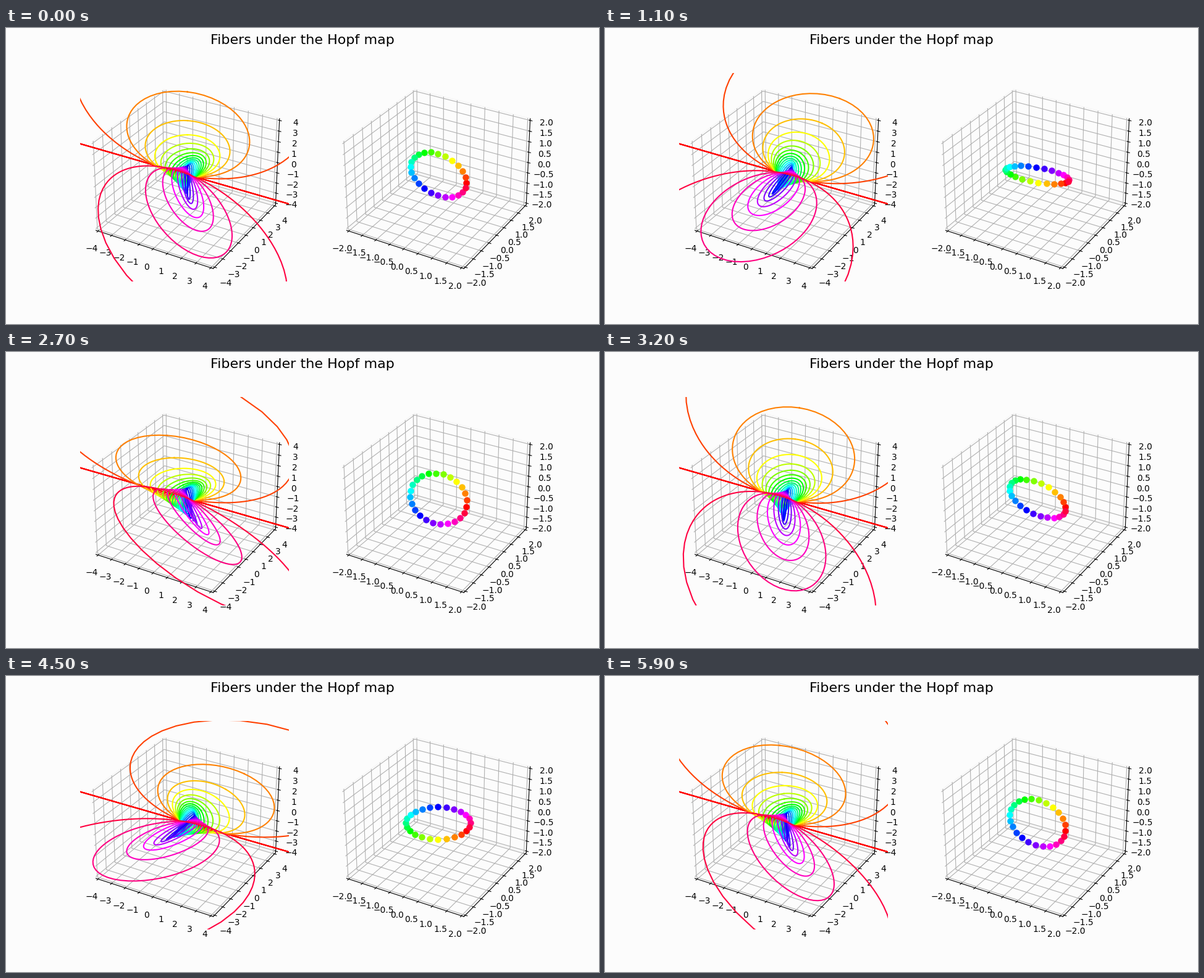
Animation of 960x480 px, one loop 6 s. Source, as a matplotlib script:

```python
import numpy as np
import matplotlib.pyplot as plt
from matplotlib.animation import FuncAnimation
from matplotlib.colors import hsv_to_rgb

FRAMES, INTERVAL = 60, 100
COUNT = 24
BG = "#fcfcfc"
PANE_EDGE = "#f0f0f0"

thetas = 2 * np.pi * np.arange(COUNT) / COUNT
colors = [hsv_to_rgb((i / COUNT, 1, 1)) for i in range(COUNT)]
s = np.radians(np.arange(361))

fig = plt.figure(figsize=(9.6, 4.8), dpi=100, facecolor=BG)
fig.suptitle("Fibers under the Hopf map", fontsize=16)


def make_axes(index, limit, step):
    ax = fig.add_subplot(1, 2, index, projection="3d")
    ax.set_facecolor("none")
    ticks = np.arange(-limit, limit + step / 2, step)
    edge = limit * 25 / 24  # small margin beyond the outer ticks
    for axis in (ax.xaxis, ax.yaxis, ax.zaxis):
        axis.set_ticks(ticks)
        axis.pane.set_facecolor(BG)
        axis.pane.set_edgecolor(PANE_EDGE)
    ax.set_xlim(-edge, edge)
    ax.set_ylim(-edge, edge)
    ax.set_zlim(-edge, edge)
    return ax


def fiber(theta, turn):
    """Stereographic image of the circle in S3 above one base point."""
    c, r = np.cos(theta / 2), np.sin(theta / 2)
    depth = np.maximum(1 - c * np.cos(s), 1e-4)
    return (c * np.sin(s) / depth,
            r * np.cos(turn - s) / depth,
            r * np.sin(turn - s) / depth)


def base_point(theta, turn):
    return (np.cos(theta),
            -np.sin(theta) * np.cos(turn),
            np.sin(theta) * np.sin(turn))


left = make_axes(1, 4, 1)
right = make_axes(2, 2, 0.5)
curves = [left.plot([], [], [], color=c, lw=1.5)[0] for c in colors]
dots = [right.plot([], [], [], "o", color=c, ms=6, mew=1.5)[0] for c in colors]


def update(k):
    # half a turn, then the orientation flips back
    turn = np.radians((90 - 6 * k) % 180)
    for theta, curve, dot in zip(thetas, curves, dots):
        curve.set_data_3d(*fiber(theta, turn))
        x, y, z = base_point(theta, turn)
        dot.set_data_3d([x], [y], [z])
    return curves + dots


anim = FuncAnimation(fig, update, frames=FRAMES, interval=INTERVAL,
                     init_func=lambda: update(0), repeat=True, blit=False)
plt.show()
```
